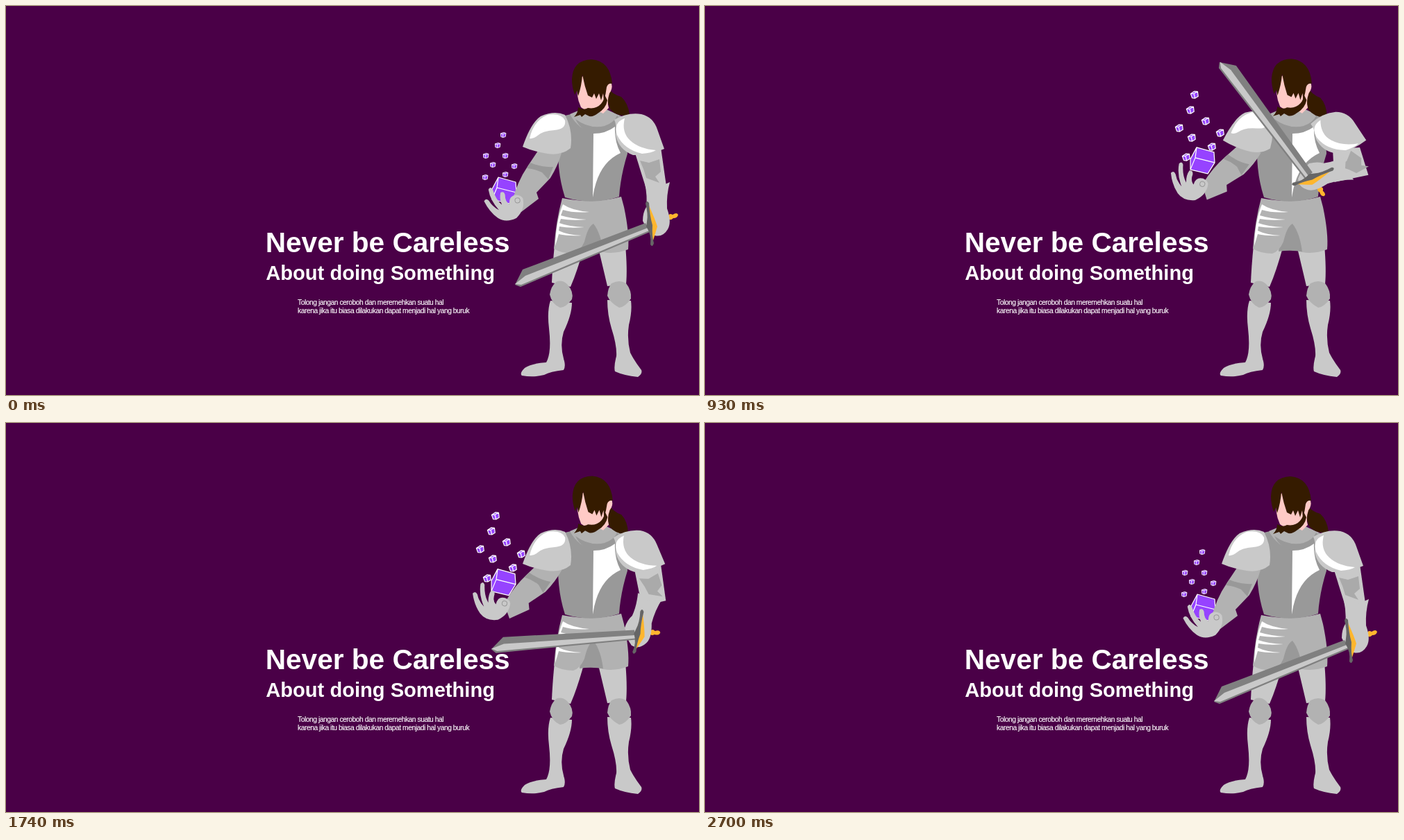
These frames come from a looping animation (998 px wide and 561 px high, 2940 ms). An HTML page:

```html
<!DOCTYPE html>
<html lang="en">
<head>
<meta charset="utf-8">
<title>Never be Careless</title>
<style>
html, body { margin: 0; width: 100%; height: 100%; overflow: hidden; background: #4a0047; }
svg { display: block; width: 100vw; height: 100vh; }
text { fill: #fff; font-family: "Liberation Sans", Arial, sans-serif; }
.bold { font-weight: bold; }
.small { font-size: 10.2px; letter-spacing: -.42px; stroke: #fff; stroke-width: .15; }
.light { fill: #c9c9c9; }
.mid { fill: #b2b2b2; }
.dark { fill: #999; }
.steel { fill: #808080; }
.white { fill: #fff; }
.gold { fill: #ffb62e; }
.hair { fill: #351b00; }
.skin { fill: #ffcac6; }
.cube { fill: #9643ff; stroke: #fff; stroke-width: 1.2; stroke-linejoin: round; }
</style>
</head>
<body>
<svg viewBox="0 0 998 561">
  <defs>
    <path id="box" class="cube" d="M-5 -3L1 -5L5.5 -3.5L4.5 3.5L-.5 5L-4.5 3.5ZM-5 -3L-.5 -2M-.5 -2L5.5 -3.5M-.5 -2V5"/>
  </defs>

  <text class="bold" x="373.7" y="354.5" font-size="40.6">Never be Careless</text>
  <text class="bold" x="374.3" y="395" font-size="29.1">About doing Something</text>
  <text class="small" x="420" y="430.5">Tolong jangan ceroboh dan meremehkan suatu hal</text>
  <text class="small" x="420" y="443">karena jika itu biasa dilakukan dapat menjadi hal yang buruk</text>

  <!-- legs -->
  <g class="light">
    <path d="M790 345H833Q823 382 813 405L786 399Q787 375 790 345Z"/>
    <path d="M784 425Q779 440 782 465Q786 500 778 514Q758 515 747 522Q739 530 743 533Q760 536 775 532Q784 527 803 525Q806 520 804 512Q797 490 803 470Q815 445 815 428Z"/>
    <path d="M852 345H892Q895 380 893 401L866 404Q860 378 852 345Z"/>
    <path d="M866 424Q866 445 872 465Q880 490 879 505Q875 520 877 527Q890 533 910 535Q917 530 915 525Q905 512 899 500Q894 480 897 460Q902 440 900 425Z"/>
  </g>
  <g class="mid">
    <path d="M792 398Q800 394 808 401Q818 412 815 423Q806 435 798 435Q786 430 783 416Q785 404 792 398Z"/>
    <path d="M872 400Q884 394 893 400Q901 410 900 422Q892 434 883 435Q870 428 866 418Q867 406 872 400Z"/>
  </g>

  <!-- torso and skirt -->
  <path class="dark" d="M832 300H862V355Q845 351 826 354Z"/>
  <path class="mid" d="M801 277Q845 286 886 275L890 290Q898 328 896 351Q878 358 860 355Q857 328 846 314Q838 318 833 340Q827 354 817 357Q800 357 789 350Q792 310 801 277Z"/>
  <path class="white" d="M802 286Q815 295 840 297Q818 299 802 294L799 302Q815 307 836 308Q815 310 799 307L797 313Q810 318 833 319Q812 321 797 318L796 324Q808 330 829 331Q810 332 796 329L791 346Q792 310 802 286Z"/>
  <path class="dark" d="M798 160Q825 152 850 154Q876 152 893 162L895 213Q885 245 883 275Q845 288 805 276Q795 245 795 210Z"/>
  <path class="mid" d="M812 156L824 151Q840 162 858 146L884 158Q874 181 845 182Q824 178 812 156Z"/>
  <path class="dark" d="M820 163Q840 178 862 173Q876 168 880 158L885 163Q874 184 846 184Q828 180 820 163Z"/>
  <path class="white" d="M846 184Q864 184 877 174Q876 195 885 212Q852 227 845 276Z"/>

  <!-- head -->
  <g id="head">
    <path id="tail" class="hair" d="M864 116Q874 128 886 131Q896 140 898 157Q882 161 871 150Q865 140 864 116Z"/>
    <path class="skin" d="M823 105Q820 130 828 146Q838 154 850 150L860 155L868 147Q865 138 869 126Q874 119 872 112L850 92Z"/>
    <path class="hair" d="M824 146Q832 151 838 147Q850 149 857 141Q862 135 862 128L866 136Q864 148 852 155Q846 160 840 159L834 156L829 160L827 157L818 160Q824 154 824 146Z"/>
    <path class="hair" d="M815 106Q816 78 843 77Q870 79 873 112Q867 111 865 117Q864 126 861 137L860 126L857 136L854 126L850 134L847 126L844 132L838 129Q833 115 830 99Q829 115 824 130L822 122L819 128Q815 116 815 106Z"/>
  </g>

  <!-- casting arm with its cubes -->
  <g id="boxes"></g>
  <path id="bigBox" class="cube" d="M708 255L733 262L734 277L724 293L699 287V272ZM708 255L706 270M706 270L734 277M706 270L699 287"/>
  <g id="armL">
    <path class="mid" d="M772 200L800 212Q795 230 784 248L764 269L767 278L742 297L730 278Q737 252 752 230Q762 215 772 200Z"/>
    <path class="dark" d="M755 226Q772 233 788 232L781 250L772 240Q762 235 750 234Z"/>
    <g id="hand">
      <path class="light" d="M742 282Q744 298 730 309Q714 315 703 306Q692 296 686 280Q689 275 693 280Q697 289 706 295Q695 280 694 264Q697 259 700 264Q703 280 711 288Q708 278 711 270Q716 268 717 274Q716 284 722 288Q722 276 733 276Q740 277 742 282Z"/>
      <circle cx="734" cy="284" r="3.6" fill="none" stroke="#999" stroke-width="1"/>
    </g>
  </g>
  <g id="padL">
    <path class="light" d="M744 203Q756 168 770 159Q790 150 805 157Q817 180 813 205Q800 216 780 213Q760 210 744 203Z"/>
    <path class="white" d="M754 191Q760 165 780 157Q800 154 805 165Q807 178 790 179Q772 180 764 188Q759 192 754 191Z"/>
  </g>

  <!-- sword arm -->
  <path id="upper" class="light"/>
  <path id="band" fill="#aaa" d="M913 223L926 226L941 221L943 239L935 246L941 255L922 248Q919 236 913 223Z"/>
  <g id="armR">
    <g id="grip">
      <path class="gold" d="M932 313L953 304Q955 298 960 301Q966 297 968 301Q967 306 961 306Q957 310 954 307L934 318Z"/>
      <path class="light" d="M920 256L938 262L956 254Q951 272 952 292Q959 312 953 322Q946 334 934 331Q922 322 917 310Q917 298 922 290Q924 275 920 256Z"/>
    </g>
    <path class="steel" d="M744 380L921 313L927 326L741 405L733 402Z"/>
    <path class="light" d="M733 401L748 389L924 320L926 324L742 402Z"/>
    <path class="gold" d="M926 288Q935 308 938 318Q934 332 931 341Q929 312 926 288Z"/>
    <path fill="#666" d="M921 285Q922 279 926 284Q927 302 931 316Q930 332 933 342Q931 349 928 344Q930 330 922 318L923 311Q925 300 921 285Z"/>
  </g>
  <g id="padR">
    <path class="light" d="M876 164Q895 153 915 156Q932 160 938 178Q944 195 948 206Q925 216 903 215Q882 207 878 186Q880 172 876 164Z"/>
    <path class="white" d="M891 162Q874 168 880 186Q890 207 916 213Q930 212 936 208Q912 206 899 194Q886 182 891 162Z"/>
  </g>
</svg>

<script>
const LOOP = 2940, STEP = 30;
const $ = id => document.getElementById(id);
const mix = (a, b, k) => a + (b - a) * k;

// Each cube: x, y at rest, then x, y above the lowered hand
const cubes = [
  [716, 186, 705, 173], [708, 201, 699, 195], [691, 216, 683, 221], [719, 216, 721, 211],
  [701, 229, 701, 235], [732, 231, 742, 228], [690, 247, 693, 263], [719, 243, 730, 248]
].map(c => {
  const el = document.createElementNS("http://www.w3.org/2000/svg", "use");
  el.setAttribute("href", "#box");
  $("boxes").append(el);
  return { el, c };
});

// Smoothly eased value at time t through [time, value] keys
function track(t, keys) {
  let [t0, v0] = keys[0];
  for (const [t1, v1] of keys) {
    if (t < t1) {
      const k = Math.max(0, (t - t0) / (t1 - t0));
      return mix(v0, v1, k * k * (3 - 2 * k));
    }
    [t0, v0] = [t1, v1];
  }
  return v0;
}

function move(id, x, y, angle = 0, cx = 0, cy = 0) {
  $(id).setAttribute("transform", `translate(${x} ${y}) rotate(${angle} ${cx} ${cy})`);
}

function draw(t) {
  const lift = track(t, [[0, 0], [680, 1], [1230, 0], [1470, 0], [2015, 1], [2700, 0]]);
  const swing = track(t, [[570, 0], [1065, 1], [1470, 1], [1845, 0]]);
  const shrug = track(t, [[0, 0], [500, 1], [1470, 1], [1760, 0]]);
  const rest = t < 680 || t > 2015 ? 1 - lift : 0;
  const reach = lift * (2 - lift);
  const arc = Math.sin(Math.PI * swing);

  move("head", 0, -lift, 2 * lift, 850, 155);
  move("tail", 0, 0, 8 * lift, 868, 130);
  move("armL", 0, 0, 26 * lift, 800, 214);
  move("hand", 3 * rest - 5 * reach, -4 * rest - 9 * reach, -6 * rest, 738, 288);
  move("padL", 4 * shrug, -4 * shrug, 8 * shrug, 780, 185);
  move("padR", 0, -4 * swing, -17 * swing, 912, 184);
  move("band", 8 * swing, -10 * swing, -60 * swing, 928, 238);
  move("armR", arc * (7 + 30 * swing), -5.5 * Math.sin(2 * Math.PI * swing), 92 * swing, 940, 233);
  move("grip", -18 * arc, 8 * arc);

  // The elbow swings outwards while the shoulder stays in place
  const outer = [mix(951, 959, swing) - 4 * arc, mix(260, 240, swing)];
  const inner = [mix(923, 908, swing) - 8 * arc, mix(267, 251, swing)];
  $("upper").setAttribute("d", `M904 206L943 204L${outer}L${inner}Z`);

  move("bigBox", rest, mix(-90 * (rest ? 1 : lift), -8, rest));
  for (const { el, c: [x0, y0, x1, y1] } of cubes) {
    const x = mix(x1, x0, rest);
    const y = mix(y1 - 79 * (rest ? 1 : lift), y0, rest);
    el.setAttribute("transform",
      `translate(${x} ${y}) rotate(${-15 * (1 - rest)}) scale(${1 - .28 * rest})`);
  }
}

const start = performance.now();
function frame(now) {
  const t = Math.max(0, now - start) % LOOP;
  draw(Math.floor(t / STEP) * STEP);
  requestAnimationFrame(frame);
}
draw(0);
requestAnimationFrame(frame);
</script>
</body>
</html>
```
